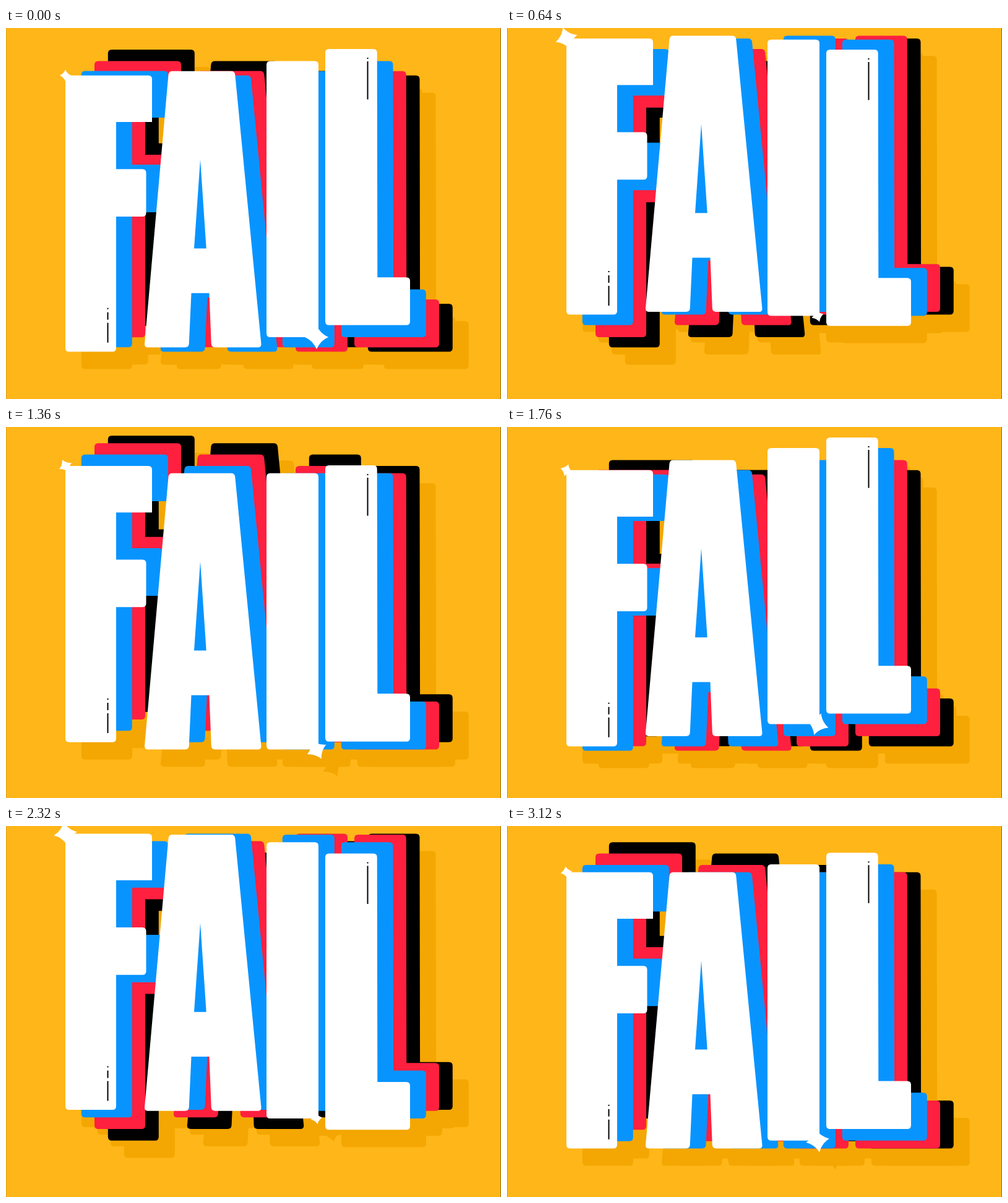
These frames come from a looping animation (800x600 px, 3.2 s). An HTML page:

```html
<!DOCTYPE html>
<html lang="en">
<head>
<meta charset="utf-8">
<title>FAIL</title>
<style>
  html, body { margin: 0; width: 100%; height: 100%; overflow: hidden; background: #ffb618; }
  svg { display: block; width: 100vw; height: 100vh; }
</style>
</head>
<body>
<svg id="stage" viewBox="0 0 800 600" role="img" aria-label="FAIL">
  <rect width="800" height="600" fill="#ffb618"/>
  <path d="M0.5 0V600" stroke="#000" stroke-opacity=".12"/>
  <path d="M799.5 0V600" stroke="#000" stroke-opacity=".4"/>
</svg>
<script>
const STEP = 80;           // ms per drawn pose
const CYCLE = 20;          // poses in one bob of a letter
const LAG = 2;             // poses between neighbouring letters and layers
const HEIGHT = 446.7;
const SHADOW = '#f4a702';
const TAU = Math.PI * 2;

// Top edge of a letter through one bob.
const bob = [76.8, 74.8, 69.8, 62, 53.4, 43.2, 33.9, 24.5, 16.9, 12.4,
             12.4, 14, 18.8, 26.2, 35, 44.6, 53.6, 63, 69.6, 74.7];

const layers = [
  { dx: 68.8, color: '#000' },
  { dx: 47, color: '#ff203f' },
  { dx: 25.8, color: '#0894ff' },
  { dx: 0, color: '#fff' }
];

const stage = document.getElementById('stage');

function add(parent, tag, attrs) {
  const el = document.createElementNS('http://www.w3.org/2000/svg', tag);
  for (const key in attrs) el.setAttribute(key, attrs[key]);
  return parent.appendChild(el);
}

// Closed outline from [x, y, cornerRadius] points.
function outline(points) {
  const toward = ([x, y, r = 0], [tx, ty]) => {
    const k = r / Math.hypot(tx - x, ty - y);
    return `${x + (tx - x) * k} ${y + (ty - y) * k}`;
  };
  return points.map((p, i) => {
    const prev = points.at(i - 1), next = points[(i + 1) % points.length];
    return `${i ? 'L' : 'M'}${toward(p, prev)}Q${p[0]} ${p[1]} ${toward(p, next)}`;
  }).join('') + 'Z';
}

const H = HEIGHT, R = 6;
const letters = [
  outline([[96, 0, R], [236, 0, R], [236, 75.3], [178, 75.3], [178, 151.5],
           [226.5, 151.5, R], [226.5, 228.3, R], [178, 228.3], [178, H, R], [96, H, R]]),
  outline([[263, 0, R], [369.7, 0, R], [413, H, R], [332, H, R], [328.5, 359],
           [299.5, 359], [295.5, H, R], [223.5, H, R]]) +
    outline([[314, 143], [323.7, 286.8], [304, 286.8]]),
  outline([[421, 0, R], [505, 0, R], [505, H, R], [421, H, R]]),
  outline([[516, 0, R], [599.7, 0, R], [600.3, 369.3], [653, 369.3, R], [653, H, R], [516, H, R]])
];

const marks = [
  { letter: 0, d: 'M164.5 376v2m0 5v12m0 5v32' },
  { letter: 3, d: 'M584.5 14v2m0 4v61.5' }
];

const stars = [
  { letter: 0, x: 96, y: 0, swell: -5 },
  { letter: 2, x: 502, y: HEIGHT, swell: 5 }
];
const STAR = 'M0-1Q.3-.3 1 0Q.3 .3 0 1Q-.3 .3-1 0Q-.3-.3 0-1Z';

const shadow = add(stage, 'g', { transform: 'translate(26 28)' });
const front = add(stage, 'g', {});
const movers = [];
const spinners = [];

for (const group of [shadow, front]) {
  const tint = color => group === shadow ? SHADOW : color;
  layers.forEach(({ dx, color }, depth) => {
    letters.forEach((d, letter) => {
      const el = add(group, 'path', { d, fill: tint(color), 'fill-rule': 'evenodd' });
      movers.push({ el, dx, offset: LAG * (letter - (layers.length - 1 - depth)) });
    });
  });
  for (const star of stars) {
    spinners.push({ ...star, el: add(group, 'path', { d: STAR, fill: tint('#fff') }) });
  }
}

for (const { letter, d } of marks) {
  const el = add(front, 'path', { d, fill: 'none', stroke: '#000', 'stroke-width': 2 });
  movers.push({ el, dx: 0, offset: LAG * letter });
}

const topAt = pose => bob[(pose % CYCLE + CYCLE) % CYCLE];

function draw(ms) {
  const pose = Math.floor(ms / STEP) % CYCLE;
  const phase = pose / CYCLE;
  for (const { el, dx, offset } of movers) {
    el.setAttribute('transform', `translate(${dx} ${topAt(pose + offset)})`);
  }
  for (const { el, letter, x, y, swell } of spinners) {
    const size = 14.2 + swell * Math.cos(TAU * phase);
    const top = topAt(pose + LAG * letter);
    el.setAttribute('transform',
      `translate(${x} ${top + y}) rotate(${180 * phase}) scale(${size})`);
  }
}

function tick() {
  draw(performance.now());
  requestAnimationFrame(tick);
}
tick();
</script>
</body>
</html>
```
